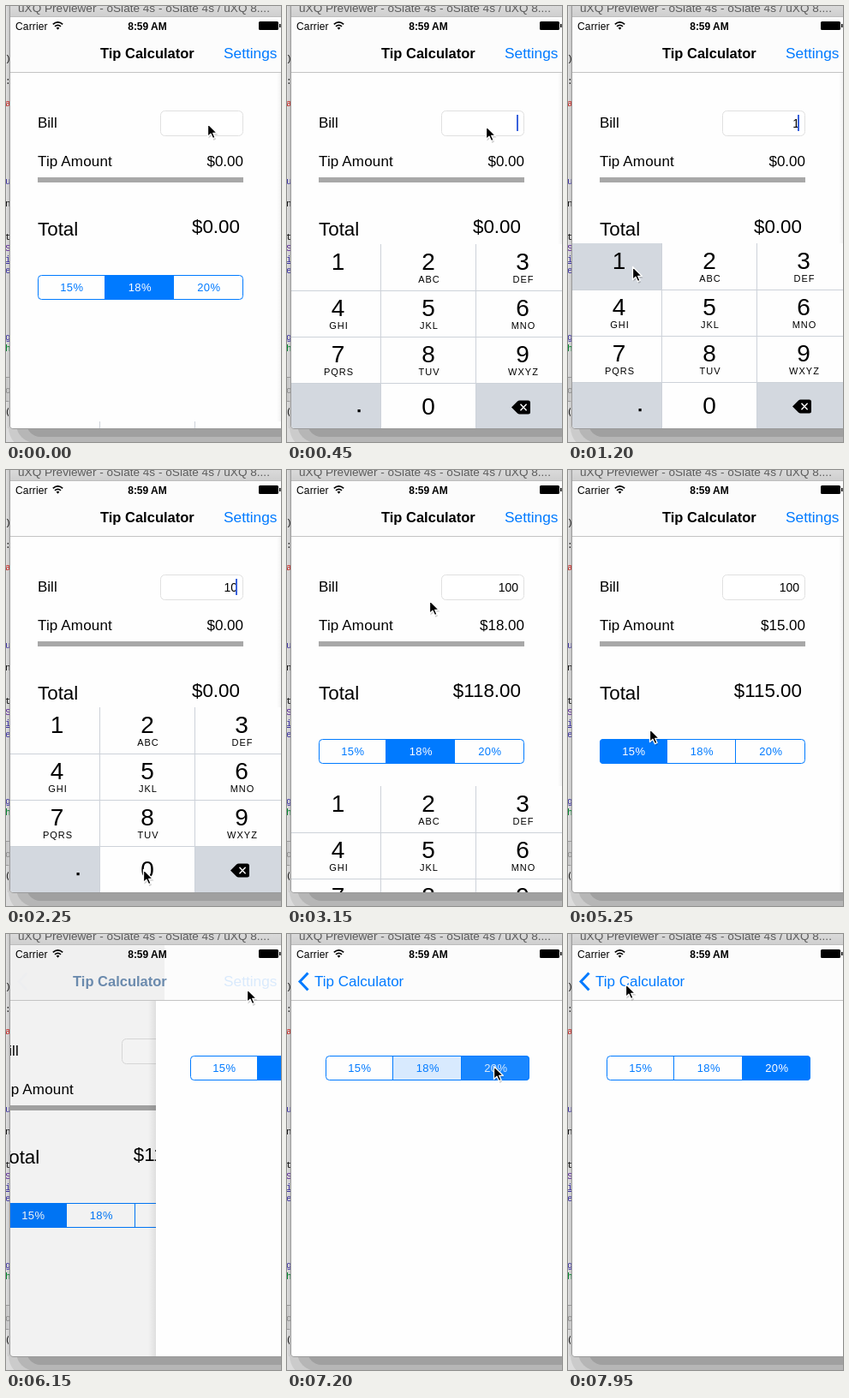
Recreate the animation shown at these times as an HTML page. Size 321 by 509 pixels, loop 8 s.

```html
<!DOCTYPE html>
<html lang="en">
<head>
<meta charset="utf-8">
<title>Tip Calculator</title>
<style>
html, body { margin: 0; width: 100%; height: 100%; overflow: hidden; background: #dcdcdc; }
svg { display: block; width: 100%; height: 100%; font-family: "Liberation Sans", Arial, sans-serif; }
.code { font: 11px "Liberation Mono", monospace; }
.end { text-anchor: end; }
.mid { text-anchor: middle; }
.t17 { font-size: 17px; }
.t22 { font-size: 22.4px; }
.blue { fill: #007aff; }
</style>
</head>
<body>
<svg viewBox="0 0 321 509" xmlns="http://www.w3.org/2000/svg">
  <defs>
    <linearGradient id="strip"><stop offset="0" stop-color="#e2e2e2"/><stop offset="1" stop-color="#bcbcbc"/></linearGradient>
    <linearGradient id="bar" x2="0" y2="1"><stop offset="0" stop-color="#dadada"/><stop offset="1" stop-color="#cecece"/></linearGradient>
    <linearGradient id="edge"><stop offset="0" stop-opacity="0"/><stop offset="1" stop-opacity=".08"/></linearGradient>
    <clipPath id="win"><path d="M5 13H321V493H9Q5 493 5 489Z"/></clipPath>
    <clipPath id="side"><rect width="5" height="509"/></clipPath>
  </defs>

  <!-- desktop behind the window -->
  <rect width="321" height="509" fill="#dcdcdc"/>
  <rect width="5" height="493" fill="url(#strip)"/>
  <rect y="433" width="5" height="28" fill="#c9c9c9"/>
  <path d="M0 433.5H5M0 461.5H5" stroke="#999"/>
  <g id="code" class="code" clip-path="url(#side)"></g>
  <rect x="3" y="440" width="400" height="78" rx="26" fill="#cbcbcb"/>
  <rect x="12" y="440" width="400" height="70" rx="22" fill="#b6b6b6"/>
  <rect x="24" y="440" width="400" height="63" rx="16" fill="#a0a0a0"/>

  <!-- window -->
  <path d="M4.5 0V489Q4.5 493.5 9 493.5H321" fill="none" stroke="#9a9a9a"/>
  <rect x="5" width="316" height="13" fill="url(#bar)"/>
  <path d="M5 12.5H321" stroke="#bdbdbd"/>
  <text x="14" y="7" font-size="13.6" fill="#5c5c5c">uXQ Previewer - oSlate 4s - oSlate 4s / uXQ 8....</text>

  <g clip-path="url(#win)">
    <rect x="5" y="13" width="316" height="480" fill="#fefefe"/>
    <g id="main">
      <text class="t17" x="37" y="142">Bill</text>
      <rect x="180.5" y="122.5" width="96" height="29" rx="5" fill="#fff" stroke="#e0e0e0"/>
      <text id="bill" class="end" x="270" y="142" font-size="14"></text>
      <rect id="caret" x="268" y="127" width="2" height="19" fill="#3a62dc"/>
      <text class="t17" x="37" y="187" letter-spacing=".15">Tip Amount</text>
      <text id="tip" class="t17 end" x="277" y="187"></text>
      <rect x="37" y="200" width="240" height="6" fill="#a8a8a8"/>
      <text class="t22" x="37" y="268">Total</text>
      <text id="total" class="t22 end" x="273" y="265"></text>
      <g id="rates"></g>
    </g>
    <rect id="dim" x="5" y="77" width="320" height="416"/>
    <g id="page">
      <rect x="-4" y="77" width="9" height="416" fill="url(#edge)"/>
      <rect x="5" y="77" width="320" height="416" fill="#fefefe"/>
      <g id="defaults"></g>
    </g>

    <rect x="5" y="13" width="316" height="64" fill="#fcfcfc"/>
    <rect id="navDim" x="5" y="13" height="64"/>
    <path d="M5 77.5H321" stroke="#c4c4c4"/>
    <text id="title" y="61">Tip Calculator</text>
    <path id="chevron" d="M24.5 45.5L15 55.5L24.5 65.5" fill="none" stroke="#007aff" stroke-width="3"/>
    <text id="settings" class="blue" x="254" y="61" font-size="17.3">Settings</text>

    <text x="11" y="27.5" font-size="12" letter-spacing=".15">Carrier</text>
    <path d="M54.8 21.3Q60.5 16.5 66.2 21.3M57 23.8Q60.5 21 64 23.8" fill="none" stroke="#000" stroke-width="1.7"/>
    <path d="M58.6 25.6Q60.5 24 62.4 25.6L60.5 27.8Z"/>
    <text class="mid" x="165" y="27.5" font-size="12" font-weight="bold">8:59 AM</text>
    <rect x="295" y="18" width="23" height="10" rx="1.5"/>
    <rect x="319" y="21" width="1.5" height="4"/>

    <g id="keys"></g>
  </g>

  <g id="mouse">
    <path d="M1 1.5V17L4.5 14L7 19.5L9.5 18L7.5 13H12Z" opacity=".18"/>
    <path d="M0 0V15L3.5 11.8L6 17.2L8.6 16L6.2 10.8H10.8Z" stroke="#fff" stroke-width="1.3" stroke-linejoin="round"/>
  </g>
</svg>
<script>
const LOOP = 8000, STEP = 150;
const $ = id => document.getElementById(id);
const set = (el, attrs) => { for (const k in attrs) el.setAttribute(k, attrs[k]); };
const clamp = v => Math.max(0, Math.min(1, v));
const lerp = (a, b, p) => a + (b - a) * p;
const smooth = p => p * p * (3 - 2 * p);
const within = (t, a, b) => t >= a && t < b;
const make = (parent, tag, attrs, text = '') => {
  const el = document.createElementNS('http://www.w3.org/2000/svg', tag);
  set(el, attrs);
  el.textContent = text;
  return parent.appendChild(el);
};

// line ends of the editor beside the window
[[')', 65], [':', 91], ['a', 117, '#c41a16'], ['u', 208, '#3a2fa0'], ['n', 234], ['t', 273],
 ['S', 286, '#5c2699'], ['i', 299, '#3a2fa0'], ['e', 312, '#3a2fa0'], ['g', 390, '#3a2fa0'],
 ['h', 403, '#00832a'], ['o', 452, '#888'], ['(3', 477]].forEach(([s, y, fill = '#111']) =>
  make($('code'), 'text', { x: -1, y, fill }, s));
make($('code'), 'path', { d: 'M0 300.5H5', stroke: '#3a2fa0' });

// segmented control; returns a function that sets the strength of each segment
function segments(g, x, y, w) {
  const cuts = [0, 79, 159, w], r = 4;
  const parts = ['15%', '18%', '20%'].map((label, i) => {
    const a = x + cuts[i], b = x + cuts[i + 1], d = i === 0
      ? `M${b} ${y}H${a + r}Q${a} ${y} ${a} ${y + r}V${y + 29 - r}Q${a} ${y + 29} ${a + r} ${y + 29}H${b}Z`
      : i === 2
      ? `M${a} ${y}H${b - r}Q${b} ${y} ${b} ${y + r}V${y + 29 - r}Q${b} ${y + 29} ${b - r} ${y + 29}H${a}Z`
      : `M${a} ${y}H${b}V${y + 29}H${a}Z`;
    const fill = make(g, 'path', { d, class: 'blue' });
    const text = make(g, 'text', { x: (a + b) / 2 + .3, y: y + 19, class: 'mid', 'font-size': 13, 'letter-spacing': .4 }, label);
    return { fill, text };
  });
  make(g, 'rect', { x: x + .5, y: y + .5, width: w - 1, height: 28, rx: r, fill: 'none', stroke: '#007aff' });
  make(g, 'path', { d: `M${x + 79 - .5} ${y}v29M${x + 159 - .5} ${y}v29`, stroke: '#007aff' });
  return levels => parts.forEach(({ fill, text }, i) => {
    set(fill, { 'fill-opacity': levels[i] });
    set(text, { fill: levels[i] === 1 ? '#fff' : levels[i] > .5 ? '#d5e8fb' : '#007aff' });
  });
}
const setRates = segments($('rates'), 37, 314, 240);
const setDefaults = segments($('defaults'), 45, 142, 238);

// switch of the selected segment, with a short cross-fade on the first step
function choose(from, to, at, t) {
  const levels = [0, 0, 0];
  if (t < at) levels[from] = 1;
  else if (t < at + STEP) { levels[from] = .15; levels[to] = .9; }
  else levels[to] = 1;
  return levels;
}

// number pad
const WHITE = '#fefefe', GREY = '#d3d8df';
const cols = [5, 109, 220, 325], centers = [59.5, 165, 275];
const letters = ['', 'ABC', 'DEF', 'GHI', 'JKL', 'MNO', 'PQRS', 'TUV', 'WXYZ'];
const caps = [];
for (let i = 0; i < 12; i++) {
  const c = i % 3, row = Math.floor(i / 3), y = 277 + 54 * row;
  caps.push(make($('keys'), 'rect', { x: cols[c], y, width: cols[c + 1] - cols[c], height: 55, fill: i === 9 || i === 11 ? GREY : WHITE }));
  if (i < 9 || i === 10) make($('keys'), 'text', { x: centers[c], y: i === 10 ? 476 : y + 29.5, class: 'mid', 'font-size': 28 }, i === 10 ? 0 : i + 1);
  if (letters[i]) make($('keys'), 'text', { x: centers[c] + 1, y: y + 45, class: 'mid', 'font-size': 11, 'letter-spacing': 1 }, letters[i]);
}
make($('keys'), 'path', { d: 'M5 331.5H321M5 385.5H321M5 439.5H321M109.5 277V493M220.5 277V493', stroke: '#cdd2d9' });
make($('keys'), 'rect', { x: 82.5, y: 470, width: 3.2, height: 3.2 });
make($('keys'), 'path', { d: 'M262 467.5L269 460.5Q270 459.5 271.5 459.5H281.5Q284 459.5 284 462V473Q284 475.5 281.5 475.5H271.5Q270 475.5 269 474.5Z' });
make($('keys'), 'path', { d: 'M272.5 463.8L279.6 471.2M279.6 463.8L272.5 471.2', stroke: '#fff', 'stroke-width': 1.4 });

// pointer stops: time, x, y
const stops = [[0, 235, 138], [400, 235, 138], [1050, 75, 305], [1300, 75, 305], [1950, 160, 467],
  [2550, 160, 467], [3000, 166, 153], [3300, 166, 153], [4050, 108, 312], [4200, 81, 324], [4350, 80, 322],
  [5130, 80, 322], [5850, 281, 65], [6350, 281, 65], [6900, 241, 155], [7250, 241, 155], [7950, 67, 59]];
function pointer(t) {
  let i = 1;
  while (i < stops.length - 1 && stops[i][0] < t) i++;
  const [t0, x0, y0] = stops[i - 1], [t1, x1, y1] = stops[i];
  const p = smooth(clamp((t - t0) / (t1 - t0)));
  return [lerp(x0, x1, p), lerp(y0, y1, p)];
}

// critically damped spring from 0 to 1
function spring(ms, rate) {
  const a = Math.max(0, ms) / 1000 * rate;
  return 1 - (1 + a) * Math.exp(-a);
}

// bold black title that turns into the blue back label
function drawTitle(p) {
  const bold = p < .5;
  set($('title'), {
    x: lerp(110, 32, Math.pow(p, 1.18)),
    fill: `rgb(0 ${Math.round(122 * p)} ${Math.round(255 * p)})`,
    opacity: 1 - 1.8 * p * (1 - p),
    'font-size': bold ? 16.5 : 17,
    'font-weight': bold ? 'bold' : 'normal'
  });
}

function draw(t) {
  const editing = within(t, 150, 3150);
  const typed = t < 1200 ? '' : t < 2100 ? '1' : t < 2400 ? '10' : '100';
  const lastKey = t < 1200 ? 150 : t < 2100 ? 1200 : t < 2400 ? 2100 : 2400;
  $('bill').textContent = typed;
  set($('caret'), { opacity: editing && (t - lastKey) % 1000 < 600 ? 1 : 0 });

  const bill = t < 3150 ? 0 : 100, tip = bill * (t < 4800 ? .18 : .15);
  $('tip').textContent = '$' + tip.toFixed(2);
  $('total').textContent = '$' + (bill + tip).toFixed(2);
  setRates(choose(1, 0, 4650, t));
  setDefaults(choose(1, 2, 7200, t));

  const drop = t < 3000 ? 208 * (1 - spring(t, 18)) : 218 * spring(t - 3070, 18);
  set($('keys'), { transform: `translate(0 ${Math.round(drop)})`, visibility: t < 3600 ? 'visible' : 'hidden' });
  set(caps[0], { fill: within(t, 1200, 1350) ? GREY : WHITE });
  set(caps[10], { fill: within(t, 2100, 2250) || within(t, 2400, 2550) ? GREY : WHITE });

  // push to the settings page
  let p = spring(t - 6037, 14);
  if (p > .995) p = 1;
  const shift = Math.round(320 * (1 - p));
  set($('main'), { transform: `translate(${Math.round(-96 * p)} 0)` });
  set($('page'), { transform: `translate(${shift} 0)` });
  set($('dim'), { opacity: .1 * p });
  set($('navDim'), { width: Math.round(shift + 19 * (1 - p)), opacity: .1 * p });
  drawTitle(p);
  set($('chevron'), { opacity: p ** 6 });
  set($('settings'), { opacity: t < 5850 ? 1 : .3 * Math.pow(1 - p, 1.3) });

  const [x, y] = pointer(t);
  set($('mouse'), { transform: `translate(${Math.round(x) + .5} ${Math.round(y) - .5})` });
}

const start = performance.now();
function tick() {
  const t = (performance.now() - start) % LOOP;
  draw(Math.floor(t / STEP) * STEP);
  requestAnimationFrame(tick);
}
tick();
</script>
</body>
</html>
```
